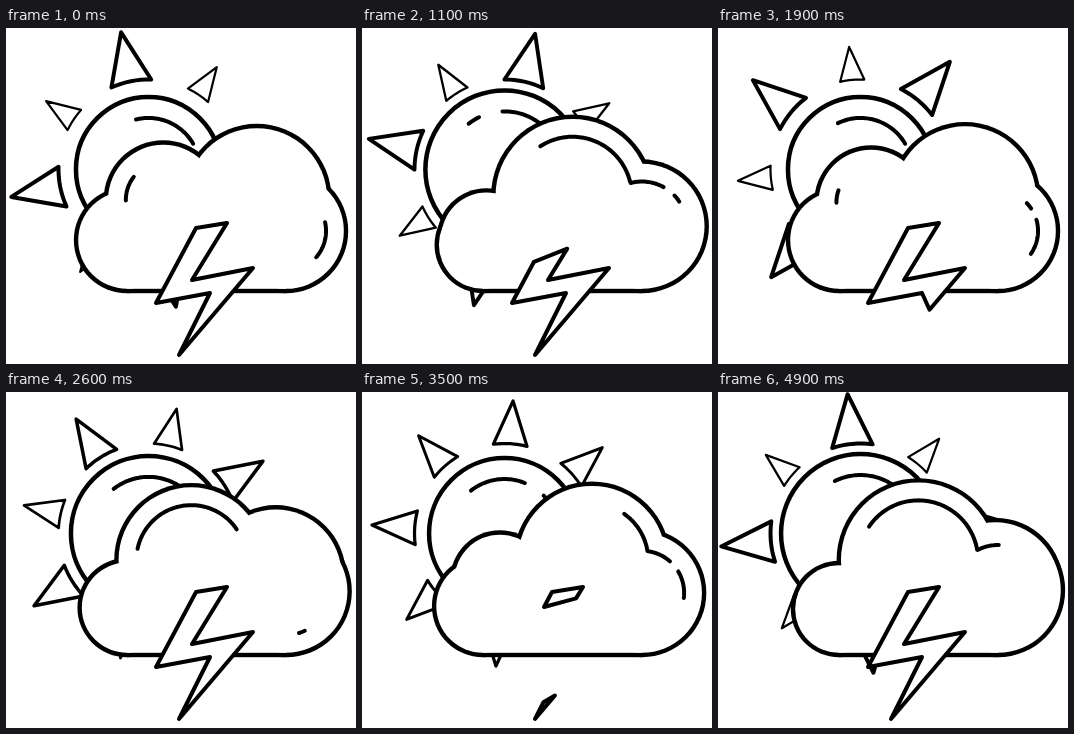
An HTML page with a canvas for the animation above (5000 ms loop, 350 by 336 pixels).

```html
<!DOCTYPE html>
<html>
<head>
<meta charset="utf-8">
<title>Thunderstorm</title>
<style>
html, body { margin: 0; width: 100%; height: 100%; overflow: hidden; background: #fff; }
canvas { display: block; }
</style>
</head>
<body>
<canvas id="stage" width="350" height="336"></canvas>
<script>
const ctx = document.getElementById('stage').getContext('2d');
const { PI, sin, cos, sqrt, min, max, abs, floor, hypot } = Math;
const LOOP = 5000, CYCLE = 2000, STEP = 100;
const SUN = { x: 142.5, y: 141.5 };
const rad = deg => deg * PI / 180;
const mix = (a, b, k) => a + (b - a) * k;
const clamp = (v, lo, hi) => min(hi, max(lo, v));
const smooth = k => { k = clamp(k, 0, 1); return k * k * (3 - 2 * k); };

// Point on a circle; degrees run counter-clockwise from the right
const polar = (c, r, deg) => [c.x + r * cos(rad(deg)), c.y - r * sin(rad(deg))];

function shape(pts, width) {
  ctx.beginPath();
  pts.forEach(p => ctx.lineTo(...p));
  ctx.closePath();
  ctx.fillStyle = '#fff';
  ctx.fill();
  ctx.lineWidth = width;
  ctx.stroke();
}

function arc(c, r, from, to, hidden = () => false) {
  if (from <= to) return;
  const n = Math.ceil((from - to) / 2);
  let pen = false;
  ctx.lineWidth = 4;
  ctx.beginPath();
  for (let i = 0; i <= n; i++) {
    const deg = mix(from, to, i / n), p = polar(c, r, deg);
    if (hidden(p, deg)) { pen = false; continue; }
    if (pen) ctx.lineTo(...p); else ctx.moveTo(...p);
    pen = true;
  }
  ctx.stroke();
}

function ray(deg, size) {
  const half = (16.5 + 4.25 * size) / rad(91);
  const pts = [polar(SUN, 131.5 + 8.5 * size, deg)];
  for (let i = -4; i <= 4; i++) pts.push(polar(SUN, 90, deg + half * i / 4));
  shape(pts, 3.1 + 0.9 * size);
}

function sun(t, pulse) {
  // A steady quarter turn per second after a slower start
  const turn = 176.3 - 0.09 * t - 30 * max(0, 1 - t / 1100);
  for (let i = 0; i < 8; i++) ray(turn + i * 45, i % 2 ? -pulse : pulse);
  const r = 76 + 3.5 * pulse;
  ctx.beginPath();
  ctx.arc(SUN.x, SUN.y, r, 0, 7);
  ctx.lineWidth = 4.5;
  ctx.stroke();
  for (let k = 0; k < 2; k++) {
    const head = 128 - 120 * (t / 1000 % 1 + k);
    arc(SUN, r - 21, min(128, head + 96), max(30, head));
  }
}

// A puff rises out of the left side, swells, and sinks into the right side
function puff(age) {
  const q = age / (2 * CYCLE);
  return {
    age,
    x: 121 + 159 * q + 5 * sin(PI * q) - 7 * sin(2 * PI * q),
    y: 168 + 48 * max(0, 1 - q / 0.35) ** 2 + 30 * max(0, (q - 0.65) / 0.35) ** 2,
    r: 47 + 33 * smooth((q - 0.1) / 0.4) - 30 * max(0, q - 0.5)
  };
}

function shine(c, side) {
  const p = c.age - 1000;
  const inside = (o, [x, y]) => hypot(x - o.x, y - o.y) < o.r - 20;
  arc(c, c.r - 20, 181 - 126 * (max(0, p) / 1500) ** 2.5, max(-10, 142 - 0.18 * p),
    pt => inside(side, pt));
  if (p < 900) return;
  const gap = 53 - 0.034 * (p - 1100);
  arc(side, side.r - 20, min(130, 44 - 0.155 * (p - 1900)), 89 - 3.92 * sqrt(p - 900),
    (pt, deg) => inside(c, pt) || abs(deg - gap) < 8);
}

function cloud(t, pulse) {
  const side = (x, r) => ({ x, y: 263 - r, r });
  const left = side(121, 48.5 - 2.5 * pulse), right = side(280, 62.5 + 2.5 * pulse);
  const age = (t + 1000) % CYCLE;
  const puffs = [puff(age), puff(age + CYCLE)];
  for (const [color, grow] of [['#000', 2.2], ['#fff', -2.2]]) {
    ctx.fillStyle = color;
    for (const c of [left, right, ...puffs]) {
      ctx.beginPath();
      ctx.arc(c.x, c.y, c.r + grow, 0, 7);
      ctx.fill();
    }
    ctx.fillRect(121, 180, 159, 83 + grow);
  }
  puffs.forEach(c => shine(c, right));
}

const TIP = [173, 327];
const LEFT = [[190, 200], [150, 275], [204, 265], TIP];
const RIGHT = [[221, 195], [186, 252], [247, 240], TIP];

// Part of a line between two positions counted in corners
function cut(line, a, b) {
  const point = h => {
    const i = min(2, floor(h));
    return line[i].map((v, n) => mix(v, line[i + 1][n], h - i));
  };
  return [point(a), ...line.filter((_, i) => i > a && i < b), point(b)];
}

function bolt(tail, head) {
  if (head <= tail) return;
  shape([...cut(LEFT, tail, max(tail, min(head, 2))),
    ...cut(RIGHT, tail, head).reverse()], 4);
}

function draw(t) {
  const p = t % CYCLE;
  const pulse = cos((t - 950) / CYCLE * 2 * PI);
  const stage = ms => clamp(ms * 0.0057, 0, 3);
  ctx.fillStyle = '#fff';
  ctx.fillRect(0, 0, 350, 336);
  ctx.strokeStyle = '#000';
  ctx.lineCap = ctx.lineJoin = 'round';
  sun(t, pulse);
  cloud(t, pulse);
  bolt(stage(p - 1021), stage(p + 535));
  bolt(0, stage(p - 1465));
}

const start = performance.now();
function frame() {
  const t = (performance.now() - start) % LOOP;
  draw(floor(t / STEP) * STEP);
  requestAnimationFrame(frame);
}
frame();
</script>
</body>
</html>
```
